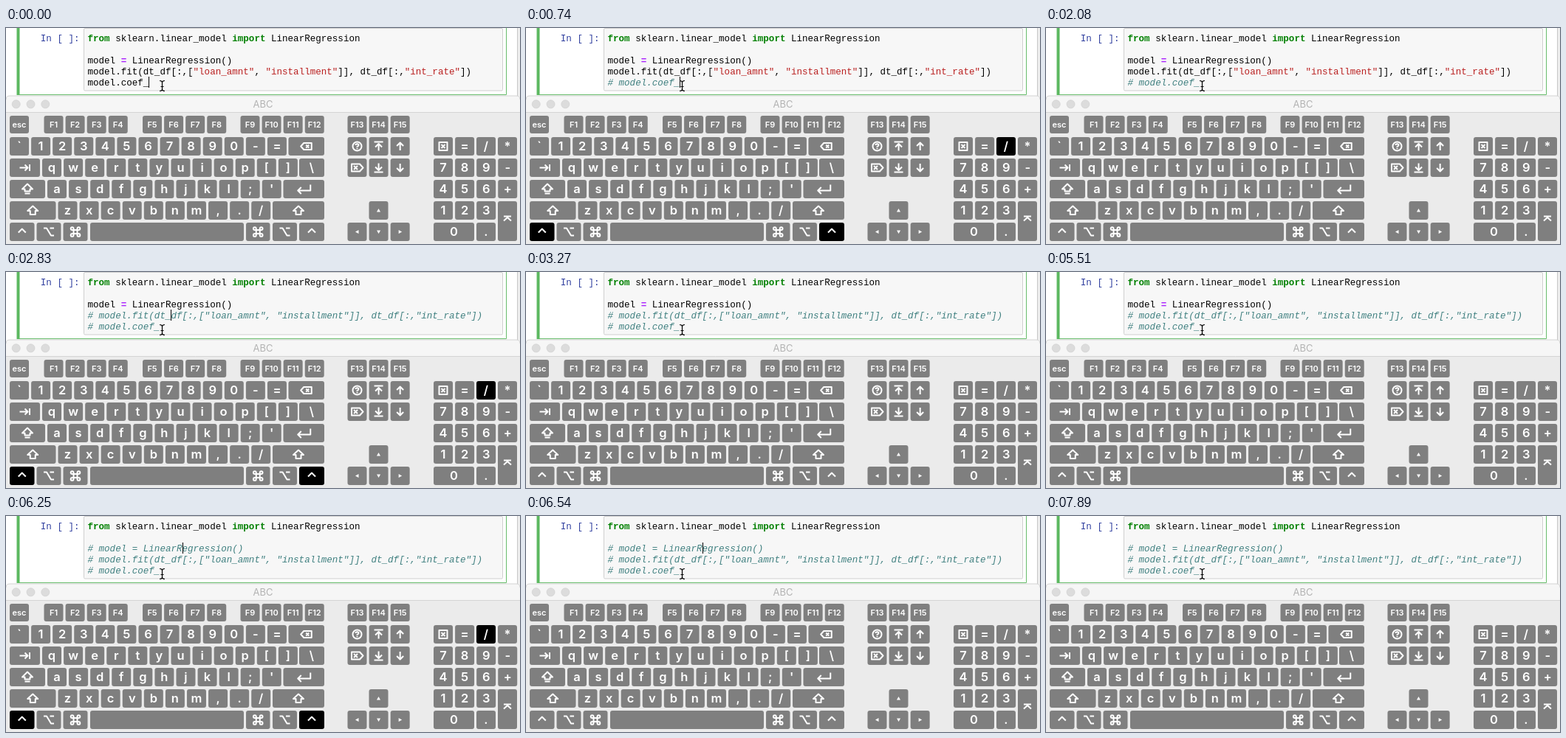
These frames come from a looping animation (696x293 px, 8000 ms). An HTML page:

```html
<!DOCTYPE html>
<html lang="en">
<head>
<meta charset="utf-8">
<title>Commenting out code</title>
<style>
html, body { margin: 0; width: 100%; height: 100%; overflow: hidden; background: #fff; }
svg { display: block; width: 696px; height: 293px; }
.code text { font: 12.56px "Liberation Mono", "Courier New", monospace; white-space: pre; }
.code .kw { fill: #008000; font-weight: bold; }
.code .op { fill: #a2f; font-weight: bold; }
.code .str { fill: #ba2121; }
.code .note { fill: #408080; font-style: italic; }
.code .prompt { fill: #303f9f; }
.key rect { fill: #7f7f7f; }
.key text { fill: #fff; text-anchor: middle; font: 600 16.5px Inter, sans-serif; }
.key .small { font-size: 11px; }
.key path { fill: none; stroke: #fff; stroke-width: 2; stroke-linejoin: round; }
.key .solid { fill: #fff; stroke: none; }
.title { fill: #b3b3b3; font: 13px Inter, sans-serif; text-anchor: middle; }

#caret, .ctrl rect, .slash rect, .plain, .note { animation: 8s step-end infinite; }
#caret { animation-name: caret; }
.ctrl rect { animation-name: ctrl; }
.slash rect { animation-name: slash; }
.plain { animation-name: var(--hide); }
.note { animation-name: var(--show); }

@keyframes caret {
  0% { opacity: 1; transform: translate(193px, 66px); }
  1.875% { opacity: 0; transform: translate(193px, 66px); }
  9.25% { opacity: 1; transform: translate(208px, 66px); }
  16.75% { opacity: 0; transform: translate(208px, 66px); }
  20.5% { opacity: 1; transform: translate(208px, 51px); }
  26% { opacity: 0; transform: translate(208px, 51px); }
  33.5% { opacity: 1; transform: translate(208px, 51px); }
  35.375% { opacity: 1; transform: translate(223px, 51px); }
  40.875% { opacity: 0; transform: translate(223px, 51px); }
  48.375% { opacity: 1; transform: translate(223px, 51px); }
  50.25% { opacity: 1; transform: translate(223px, 36px); }
  55.875% { opacity: 0; transform: translate(223px, 36px); }
  63.25% { opacity: 1; transform: translate(223px, 36px); }
  68.875% { opacity: 0; transform: translate(223px, 36px); }
  76.25% { opacity: 1; transform: translate(223px, 36px); }
  78.125% { opacity: 1; transform: translate(239px, 36px); }
  85.5% { opacity: 0; transform: translate(239px, 36px); }
  91.125% { opacity: 1; transform: translate(239px, 36px); }
  98.625%, 100% { opacity: 0; transform: translate(239px, 36px); }
}
@keyframes ctrl {
  0%, 13%, 40.875%, 81.75%, 100% { fill: #7f7f7f; }
  3.75%, 27.875%, 70.625% { fill: #000; }
}
@keyframes slash {
  0%, 11.125%, 39.125%, 80%, 100% { fill: #7f7f7f; }
  7.5%, 33.5%, 76.25% { fill: #000; }
}
@keyframes hide5 { 0% { opacity: 1; } 9.25%, 100% { opacity: 0; } }
@keyframes show5 { 0% { opacity: 0; } 9.25%, 100% { opacity: 1; } }
@keyframes hide4 { 0% { opacity: 1; } 35.375%, 100% { opacity: 0; } }
@keyframes show4 { 0% { opacity: 0; } 35.375%, 100% { opacity: 1; } }
@keyframes hide3 { 0% { opacity: 1; } 78.125%, 100% { opacity: 0; } }
@keyframes show3 { 0% { opacity: 0; } 78.125%, 100% { opacity: 1; } }
</style>
</head>
<body>
<svg viewBox="0 0 696 293">
  <rect width="696" height="293" fill="#fff"/>
  <rect x="692" width="4" height="97" fill="#eee"/>
  <path d="M692.5 0V92" stroke="#c8c8c8"/>
  <path d="M677.5 0V90.5H16" fill="none" stroke="#66bb6a"/>
  <rect x="14.5" width="4" height="91" fill="#5cb860"/>
  <rect x="105.5" y=".5" width="567" height="84.5" rx="1.5" fill="#f7f7f7" stroke="#cfcfcf"/>
  <g class="code">
    <text class="prompt" x="46.8" y="17.5">In [ ]:</text>
    <text x="110.5" y="17.5"><tspan class="kw">from</tspan> sklearn.linear_model <tspan class="kw">import</tspan> LinearRegression</text>
    <g style="--hide:hide3;--show:show3">
      <text class="plain" x="110.5" y="47.5">model <tspan class="op">=</tspan> LinearRegression()</text>
      <text class="note" x="110.5" y="47.5"># model = LinearRegression()</text>
    </g>
    <g style="--hide:hide4;--show:show4">
      <text class="plain" x="110.5" y="62.5">model.fit(dt_df[:,[<tspan class="str">"loan_amnt"</tspan>, <tspan class="str">"installment"</tspan>]], dt_df[:,<tspan class="str">"int_rate"</tspan>])</text>
      <text class="note" x="110.5" y="62.5"># model.fit(dt_df[:,["loan_amnt", "installment"]], dt_df[:,"int_rate"])</text>
    </g>
    <g style="--hide:hide5;--show:show5">
      <text class="plain" x="110.5" y="77.5">model.coef_</text>
      <text class="note" x="110.5" y="77.5"># model.coef_</text>
    </g>
  </g>
  <rect id="caret" width="1" height="15"/>
  <path d="M208 71.5q3 0 3.5 2q.5-2 3.5-2M211.5 73V84M208 85.5q3 0 3.5-2q.5 2 3.5 2M209.5 79.5h4" fill="none" stroke="#000" stroke-width="1.2"/>

  <path d="M0 293V97q0-5 5-5H691q5 0 5 5V293z" fill="#ebebeb"/>
  <path d="M0 114V97q0-5 5-5H691q5 0 5 5V114z" fill="#f6f6f6"/>
  <path d="M0 97q0-5 5-5H691q5 0 5 5M0 114.5H696" fill="none" stroke="#d4d4d4"/>
  <g fill="#dcdcdc" stroke="#cecece" stroke-width=".7">
    <circle cx="13.7" cy="103.3" r="5.5"/><circle cx="33.5" cy="103.3" r="5.5"/><circle cx="53.3" cy="103.3" r="5.5"/>
  </g>
  <text class="title" x="348" y="108">ABC</text>
  <g id="keys"></g>
</svg>
<script>
const icons = {
  back: 'M-7.5 0L-3.5-4.5H7V4.5H-3.5zM-.5-2L3.5 2M3.5-2L-.5 2',
  del: 'M8 0L3.5-5H-7.5V5H3.5zM-4.5-2.5L.5 2.5M.5-2.5L-4.5 2.5',
  tab: 'M-7 0H4M0-4L4 0L0 4M6.5-4.5V4.5',
  caps: 'M0-7L7 0H3.5V3H-3.5V0H-7zM-3.5 6H3.5',
  enter: 'M9-6V2H-8M-3.5-2.5L-8 2L-3.5 6.5',
  shift: 'M0-6L7 .5H3.5V5.5H-3.5V.5H-7z',
  ctrl: 'M-5 1L0-4L5 1',
  opt: 'M-7-5H-3L3 5H7M1.5-5H7',
  cmd: 'M-2.5-2.5H2.5V2.5H-2.5zM-2.5-2.5H-4.4A1.9 1.9 0 1 1-2.5-4.4zM2.5-2.5V-4.4A1.9 1.9 0 1 1 4.4-2.5zM2.5 2.5H4.4A1.9 1.9 0 1 1 2.5 4.4zM-2.5 2.5V4.4A1.9 1.9 0 1 1-4.4 2.5z',
  help: 'M-6 0A6 6 0 1 1 6 0A6 6 0 1 1-6 0M-2-1.5Q-2-3.3 0-3.3T2-1.5Q2-.5 0 .4V1.2M0 2.3V3.7',
  home: 'M-6-6H6M0 6V-3M-4.5 1L0-3.5L4.5 1',
  end: 'M-6 6H6M0-6V3M-4.5-1L0 3.5L4.5-1',
  pgup: 'M0 5.5V-5M-4.5-.5L0-5L4.5-.5',
  pgdn: 'M0-5.5V5M-4.5 .5L0 5L4.5 .5',
  clear: 'M-5.5-5.5H5.5V5.5H-5.5zM-2.5-2.5L2.5 2.5M2.5-2.5L-2.5 2.5',
  numenter: 'M-5-6.5H5M-5-.5L0-5L5-.5'
};
const arrows = {
  up: 'M0-2.5L2.5 2H-2.5z', down: 'M0 2.5L2.5-2H-2.5z',
  left: 'M-2.5 0L2-2.5V2.5z', right: 'M2.5 0L-2-2.5V2.5z'
};
let out = '';

function key(label, x, y, w = 26, h = 25, cls = '') {
  const cx = x + w / 2, cy = y + h / 2;
  const small = y < 140;
  const at = `transform="translate(${cx} ${cy})"`;
  let face = '';
  if (icons[label]) face = `<path ${at} d="${icons[label]}"/>`;
  else if (arrows[label]) face = `<path class="solid" ${at} d="${arrows[label]}"/>`;
  else if (label) face = `<text class="${small ? 'small' : ''}" x="${cx}" y="${cy + (small ? 3.7 : 5.5)}">${label}</text>`;
  out += `<g class="key ${cls}"><rect x="${x}" y="${y}" width="${w}" height="${h}" rx="3"/>${face}</g>`;
}
function row(labels, x, y, h) {
  labels.forEach((label, i) => key(label, x + 29.08 * i, y, 26, h));
}

const [r0, r1, r2, r3, r4, r5] = [119, 148, 177, 206, 235, 264];

row(['esc'], 5, r0, 24);
[[1, 51.5], [5, 185], [9, 317.5]].forEach(([n, x]) =>
  row([0, 1, 2, 3].map(i => 'F' + (n + i)), x, r0, 24));
row(['F13', 'F14', 'F15'], 462.5, r0, 24);

row([...'`1234567890-='], 5, r1);
key('back', 382.5, r1, 48.5);
key('tab', 5, r2, 41);
row([...'qwertyuiop[]'], 49, r2);
key('\\', 397, r2, 34);
key('caps', 5, r3, 48);
row([...'asdfghjkl;\''], 56, r3);
key('enter', 375.5, r3, 55.5);
key('shift', 5, r4, 62.5);
row([...'zxcvbnm,./'], 70.5, r4);
key('shift', 361, r4, 70);

key('ctrl', 5, r5, 33.5, 25, 'ctrl');
key('opt', 41.5, r5, 33);
key('cmd', 77.5, r5, 33);
key('', 114, r5, 208);
key('cmd', 325, r5, 32.5);
key('opt', 361, r5, 33);
key('ctrl', 397, r5, 34, 25, 'ctrl');

row(['help', 'home', 'pgup'], 462.5, r1);
row(['del', 'end', 'pgdn'], 462.5, r2);
row(['up'], 491.5, r4);
row(['left', 'down', 'right'], 462.5, r5);

row(['clear', '='], 579, r1);
key('/', 637, r1, 26, 25, 'slash');
row(['*'], 666, r1);
row([...'789-'], 579, r2);
row([...'456+'], 579, r3);
row([...'123'], 579, r4);
key('numenter', 666, r4, 26, 54);
key('0', 579, r5, 55);
key('.', 637, r5);

document.getElementById('keys').innerHTML = out;
</script>
</body>
</html>
```
